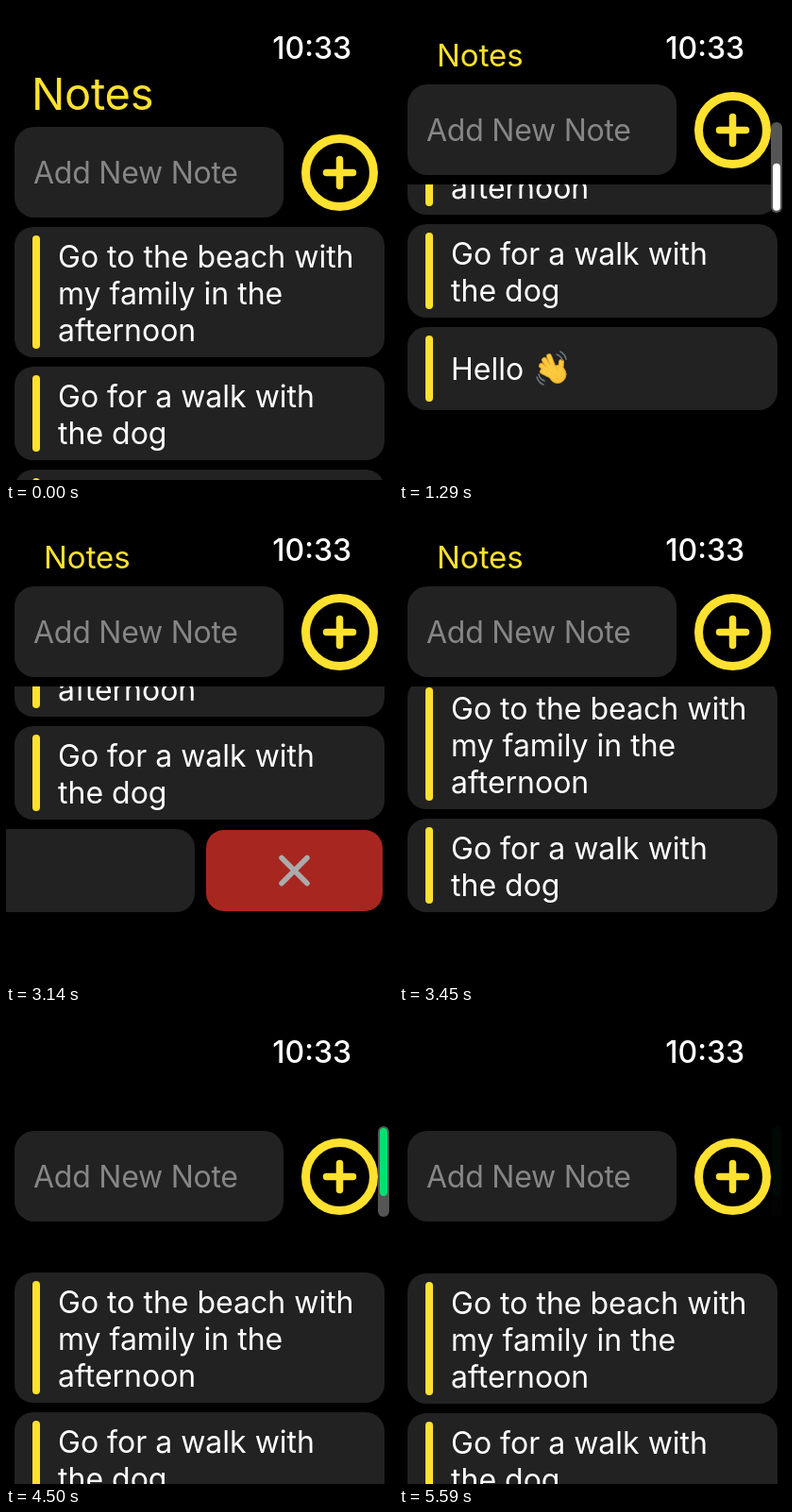
Animation, 410 px wide and 502 px high, one loop 5660 ms. Source, as an HTML page:

```html
<!DOCTYPE html>
<html lang="en">
<head>
<meta charset="utf-8">
<title>Notes</title>
<style>
  html, body { margin: 0; width: 100%; height: 100%; overflow: hidden; background: #000; }
  svg { display: block; width: 410px; height: 502px; }
  text { font: 32px Inter, Roboto, sans-serif; font-optical-sizing: none; fill: #fff; }
  .card { fill: #222; }
  .yellow { fill: #ffe12f; }
  .line { fill: none; stroke-linecap: round; }
</style>
</head>
<body>
<svg viewBox="0 0 410 502">
  <defs>
    <clipPath id="view"><rect id="viewBox" width="410" height="502"/></clipPath>
  </defs>
  <g clip-path="url(#view)"><g id="list"></g></g>
  <text id="large" class="yellow" x="27" y="110" style="font-size:47px;letter-spacing:-.3px">Notes</text>
  <text id="small" class="yellow" x="40" y="64" style="font-size:33px">Notes</text>
  <text x="366" y="56" text-anchor="end" style="font-weight:500">10:33</text>
  <g id="header">
    <rect class="card" x="9" y="128" width="285" height="96" rx="21"/>
    <text x="29" y="188" style="fill:#868686;letter-spacing:-.25px">Add New Note</text>
    <g class="line" stroke="#ffe12f">
      <circle cx="353.5" cy="176.5" r="36" stroke-width="9"/>
      <path d="M339.5 176.5h28m-14-14v28" stroke-width="7.5"/>
    </g>
  </g>
  <g id="scroll">
    <rect x="394" y="123" width="12" height="96" rx="6" fill="#555"/>
    <rect id="thumb" x="396" width="8" rx="4"/>
  </g>
</svg>
<script>
const $ = id => document.getElementById(id);
const LOOP = 5660;

// Bursts of evenly spaced updates: first, last, count
const bursts = [[0, 0, 1], [660, 1190, 6], [1290, 1290, 1], [1570, 2100, 6], [2320, 2520, 3],
  [3040, 3450, 5], [4300, 4820, 6], [4920, 5120, 3], [5470, 5590, 2]];
const ticks = bursts.flatMap(([a, b, n]) =>
  Array.from({ length: n }, (_, i) => Math.floor((a + (b - a) * i / Math.max(1, n - 1)) / 10) * 10));

// Piecewise linear tracks: time, value pairs
const tracks = {
  listY: [560, 234, 660, 220, 760, 180, 870, 140, 980, 108, 1080, 89, 1190, 83, 3140, 83,
    3240, 112, 3350, 162, 3450, 181, 4200, 181, 4300, 194, 4400, 240, 4500, 278,
    4610, 287, 4710, 286, 4820, 283, 4920, 281, 5020, 280, 5120, 279],
  headY: [870, 0, 980, -18, 1080, -38, 1190, -45, 4200, -45, 4300, -30, 4400, -8, 4500, 0],
  titleY: [560, 0, 660, 2, 870, 12, 1080, 22],
  large: [870, 1, 980, .4, 1080, 0],
  small: [980, 0, 1190, 1, 4200, 1, 4400, 0],
  press: [560, 0, 760, 1, 870, 1, 1080, 0],
  swipe: [1470, 0, 1570, -14, 1780, -78, 1990, -156, 2100, -218, 2220, -218, 2320, -211, 2520, -201],
  button: [2940, 1, 3140, .67],
  row: [3140, 1, 3240, .5, 3350, .15, 3450, 0],
  bar: [560, 0, 660, .6, 760, 1, 1470, 1, 1780, 0, 4200, 0, 4300, .6, 4400, 1, 5370, 1, 5470, .5, 5590, .04]
};

function at(t, k) {
  if (t <= k[0]) return k[1];
  for (let i = 2; i < k.length; i += 2)
    if (t <= k[i]) return k[i - 1] + (k[i + 1] - k[i - 1]) * (t - k[i - 2]) / (k[i] - k[i - 2]);
  return k[k.length - 1];
}

function card(id, y, h, lines, base, extra = "") {
  const words = lines.map((s, i) => `<text x="55" y="${base + 39 * i}">${s}</text>`).join("");
  return `<g transform="translate(0 ${y})"><g id="${id}">
    <rect class="card" x="9" width="392" height="${h}" rx="20"/>
    <g><rect class="yellow" x="28" y="9" width="8" height="${h - 18}" rx="4"/>${words}${extra}</g></g></g>`;
}

const fingers = "M3 5L-4-13M1 6L-9-9M0 7L-12-3M1 9L-11 3M6 6Q9 0 9-7";
const hand = `<g class="line" transform="translate(163 44)">
  <path d="${fingers}" stroke="#d79a25" stroke-width="6"/>
  <ellipse cx="5" cy="6" rx="9" ry="9.5" fill="#f8c437" stroke="#d79a25"/>
  <path d="${fingers}" stroke="#fbc93d" stroke-width="4.2"/>
  <path d="M4-15q5 2 6 6M8-18q5 3 6 8M-15 6q1 5 6 7M-17 9q2 6 7 8" stroke="#66747c" stroke-width="1.6"/></g>`;

$("list").innerHTML =
  card("beach", 0, 138, ["Go to the beach with", "my family in the", "afternoon"], 42.5) +
  card("walk", 148, 99, ["Go for a walk with", "the dog"], 42.5) +
  `<g id="last"><g id="remove">
    <rect x="212" y="258" width="187" height="86" rx="19" fill="#fb3a30"/>
    <path class="line" d="M292 287.500l27 27m0-27l-27 27" stroke="#fff" stroke-width="5.500"/></g>` +
  card("hello", 257, 88, ["Hello"], 56, hand) + `</g>`;
const helloBack = $("hello").firstElementChild;
helloBack.setAttribute("stroke-width", 4);
helloBack.setAttribute("paint-order", "stroke");

const move = (id, x, y) => $(id).setAttribute("transform", `translate(${x} ${y})`);
const fade = (id, v) => $(id).setAttribute("opacity", v);

function draw(now) {
  const time = now % LOOP;
  const t = ticks.filter(k => k <= time).pop();
  const v = {};
  for (const name in tracks) v[name] = at(t, tracks[name]);

  move("list", 0, v.listY);
  move("header", 0, v.headY);
  move("large", 0, v.titleY);
  move("hello", v.swipe, 0);
  $("viewBox").setAttribute("y", 234 + v.headY);
  fade("large", v.large);
  fade("small", v.small);
  fade("remove", v.swipe ? v.button : 0);
  fade("last", v.row);
  helloBack.setAttribute("stroke", v.swipe ? "#000" : "none");

  $("walk").setAttribute("transform", `translate(205 49.5) scale(${1 - .015 * v.press}) translate(-205 -49.5)`);
  $("walk").lastElementChild.setAttribute("opacity", 1 - .22 * v.press);

  const late = t >= 4200;
  const thumb = $("thumb");
  thumb.setAttribute("y", 125 + Math.max(0, .213 * (234 - v.listY - v.headY)));
  thumb.setAttribute("height", late ? 72 : 50);
  thumb.setAttribute("fill", late && v.listY >= 234 ? "#05df72" : "#fff");
  fade("scroll", v.bar);
}

let start;
function frame(now) {
  start ??= now;
  draw(now - start);
  requestAnimationFrame(frame);
}
draw(0);
requestAnimationFrame(frame);
</script>
</body>
</html>
```
